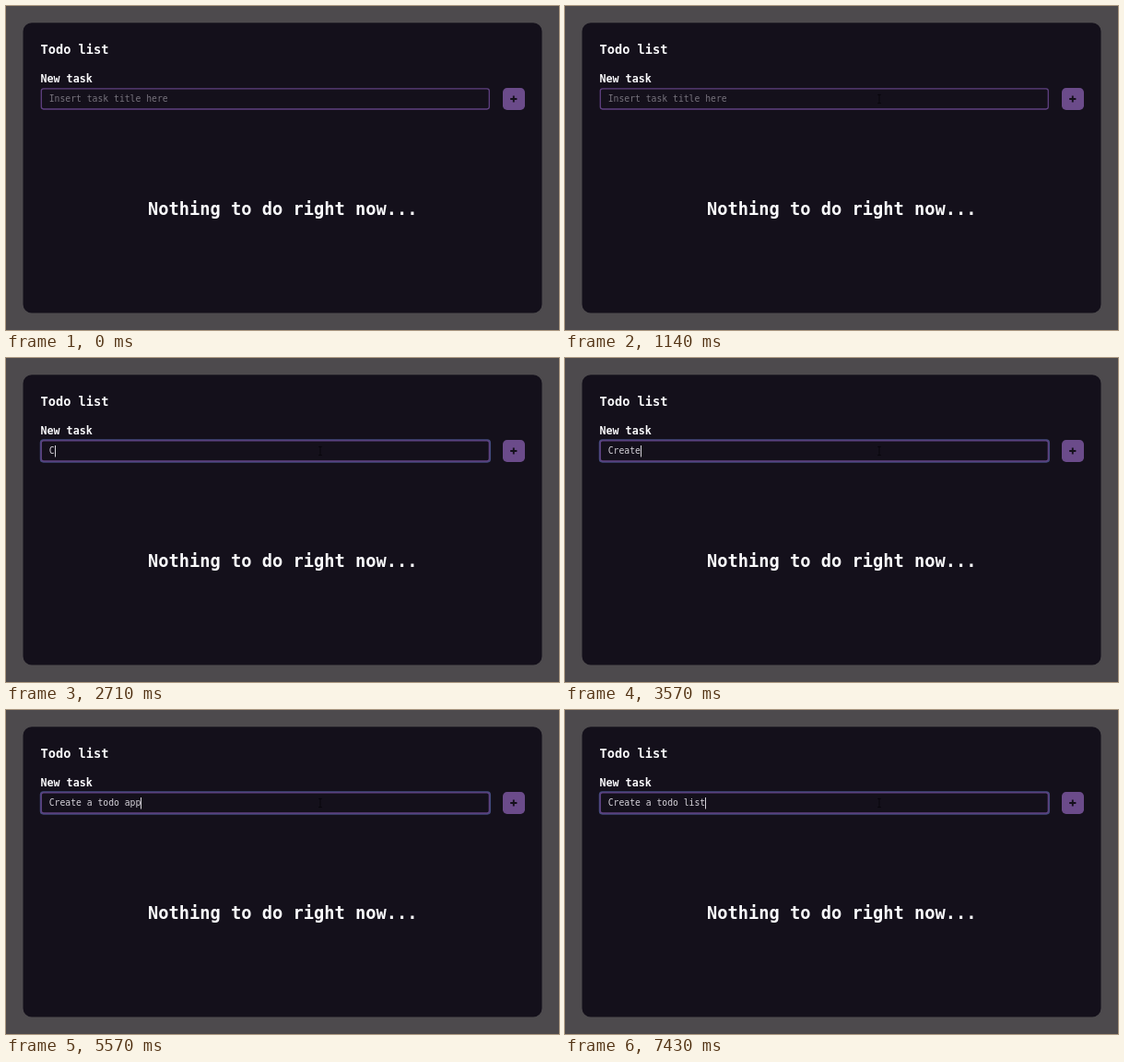
Recreate the animation shown at these times as an HTML page. Size 600x352 px, loop 8000 ms.

```html
<!DOCTYPE html>
<html lang="en">
<head>
<meta charset="utf-8">
<title>Todo list</title>
<style>
  html, body { margin: 0; width: 100%; height: 100%; overflow: hidden; background: #4d4a4d; }
  svg { display: block; width: 600px; height: 352px; }
  text { font-family: "DejaVu Sans Mono", "Noto Sans Mono", monospace; fill: #fafafc; }
  .bold { font-weight: 700; }
</style>
</head>
<body>
<svg viewBox="0 0 600 352">
  <rect width="600" height="352" fill="#4d4a4d"/>
  <rect x="18.5" y="18.3" width="563" height="315.2" rx="9.4" fill="#14101b"/>
  <text class="bold" x="37.5" y="52" font-size="13.67">Todo list</text>
  <text class="bold" x="37.5" y="83.3" font-size="11.68">New task</text>

  <rect id="ring" x="37.6" y="89.1" width="487.6" height="23.7" rx="3" fill="none" stroke="#414a7c" stroke-width="1.7"/>
  <rect x="38.3" y="89.9" width="486" height="22.1" rx="2.4" fill="none" stroke="#5f4080" stroke-width="1.3"/>
  <text id="entry" x="46.7" y="104.4" font-size="9.74"></text>
  <rect id="caret" y="95" width="1" height="12.5" fill="#d6d3da"/>

  <rect x="539" y="89" width="24" height="24" rx="4.7" fill="#6b4b8a"/>
  <path d="M547.2 101H554.4M550.8 97.4V104.6" stroke="#14101b" stroke-width="1.9"/>
  <text class="bold" x="300.2" y="227" font-size="18.69" text-anchor="middle">Nothing to do right now...</text>

  <path id="arrow" d="M0 0V9.6L2.3 7.6L3.8 10.9L5.3 10.2L3.9 7H6.9Z" fill="#050406" stroke="#e8e6ea" stroke-width=".7"/>
  <path id="beam" d="M-1.8 -4.6H1.8M0 -4.6V4.6M-1.8 4.6H1.8" fill="none" stroke="#08060c"/>
</svg>
<script>
const LOOP = 8000, FRAME = 1000 / 7, FOCUS = 1860;
const ADVANCE = 5.86, TEXT_X = 46.7;
const first = "Create a todo app", second = "Create a todo list";

// [time, phrase, characters shown]
const typing = [
  [2710, first, 1], [3140, first, 3], [3285, first, 4], [3570, first, 6],
  [3710, first, 8], [4000, first, 9], [4570, first, 11], [4710, first, 12],
  [4855, first, 13], [5140, first, 14], [5285, first, 15], [5425, first, 16],
  [5570, first, 17], [6290, first, 16], [6425, first, 15], [6570, first, 14],
  [7000, second, 15], [7140, second, 16], [7285, second, 17], [7430, second, 18]
];

const el = id => document.getElementById(id);
const show = (id, on) => el(id).style.display = on ? "" : "none";

function drawEntry(t) {
  const step = typing.findLast(s => t >= s[0]);
  const count = step ? step[2] : 0;
  el("entry").textContent = step ? step[1].slice(0, count) : "Insert task title here";
  el("entry").style.fill = step ? "#d6d3da" : "#77737d";
  el("caret").setAttribute("x", Math.round(TEXT_X + count * ADVANCE));
  show("ring", t >= FOCUS);
  show("caret", t >= FOCUS);
}

function drawPointer(t) {
  // The pointer advances in steps and eases into the field.
  const step = Math.floor((t - 425) / FRAME);
  const left = 1 - Math.min(Math.max(step + 0.4, 0) / 5, 1);
  const x = 341 + 254 * left ** 1.4, y = 101 + 66 * left ** 1.7;
  const inField = x < 525 && y < 113;
  const visible = t >= 425;
  for (const id of ["arrow", "beam"]) el(id).setAttribute("transform", `translate(${x} ${y})`);
  show("arrow", visible && !inField);
  show("beam", visible && inField);
}

function draw(now) {
  const t = now % LOOP;
  drawEntry(t);
  drawPointer(t);
  requestAnimationFrame(draw);
}
draw(0);
</script>
</body>
</html>
```
